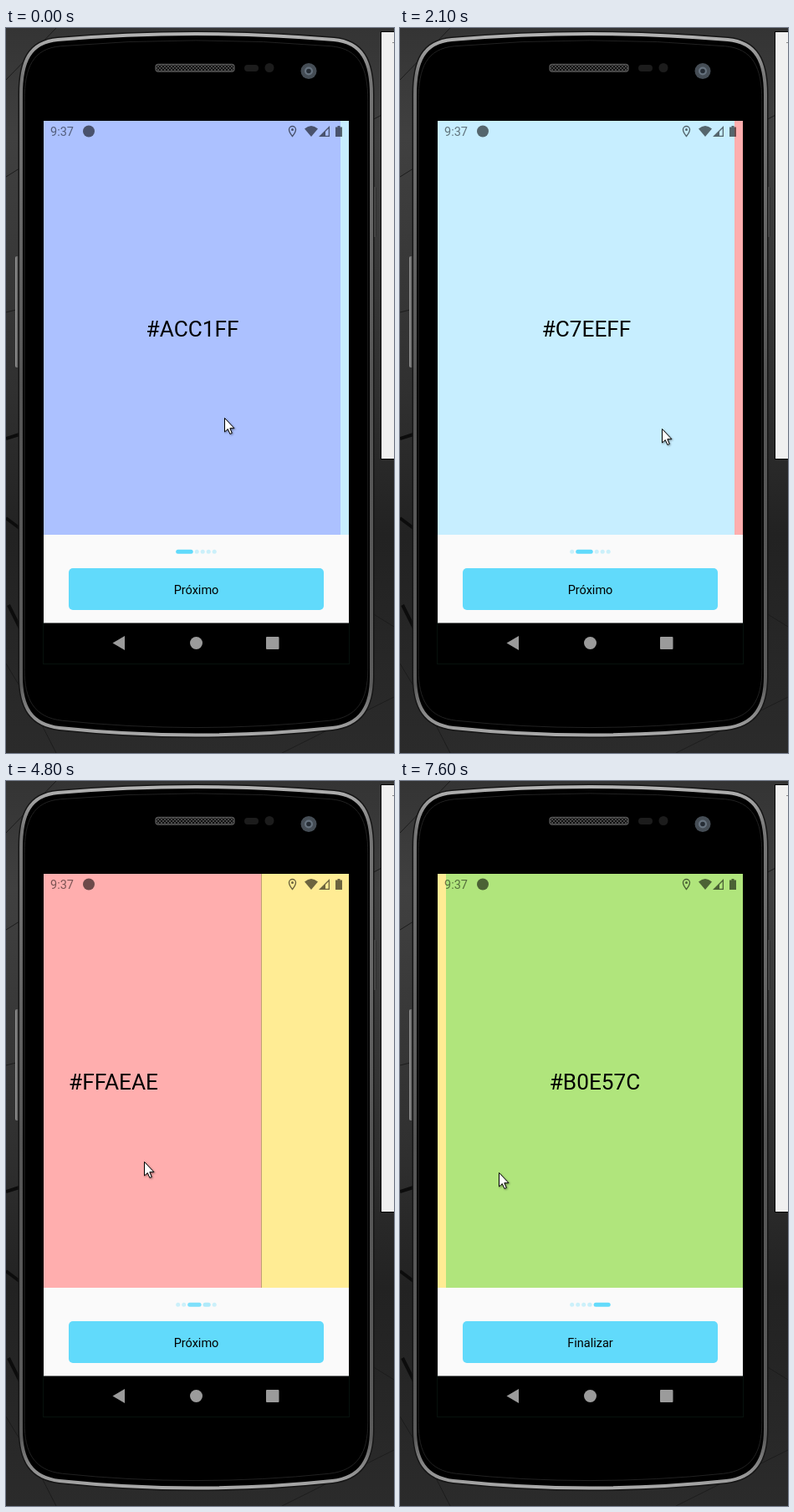
An HTML page that plays this animation: 464x867 px, repeating every 8000 ms.

```html
<!DOCTYPE html>
<html lang="pt">
<head>
<meta charset="utf-8">
<style>
  html, body { margin: 0; height: 100%; overflow: hidden; background: #2b2b2b; }
  svg { display: block; width: 464px; height: 867px; font-family: Roboto, sans-serif; }
  .label { font-size: 26.2px; text-anchor: middle; }
  .small { font-size: 14.5px; }
</style>
</head>
<body>
<svg viewBox="0 0 464 867">
  <defs>
    <linearGradient id="wall" x2="0" y2="1">
      <stop offset="0" stop-color="#343434"/><stop offset=".15" stop-color="#404040"/>
      <stop offset=".5" stop-color="#303030"/><stop offset=".7" stop-color="#222"/>
      <stop offset="1" stop-color="#2b2b2b"/>
    </linearGradient>
    <linearGradient id="rim" x2="0" y2="1">
      <stop offset="0" stop-color="#b4b4b4"/><stop offset=".06" stop-color="#777"/>
      <stop offset=".5" stop-color="#555"/><stop offset=".93" stop-color="#5c5c5c"/>
      <stop offset="1" stop-color="#aaa"/>
    </linearGradient>
    <linearGradient id="key">
      <stop offset="0" stop-color="#999"/><stop offset=".5" stop-color="#666"/>
      <stop offset="1" stop-color="#222"/>
    </linearGradient>
    <pattern id="mesh" width="4" height="4" patternUnits="userSpaceOnUse">
      <rect width="4" height="4" fill="#111"/>
      <path d="M0 0L4 4M4 0L0 4" stroke="#555" stroke-width=".8"/>
    </pattern>
    <clipPath id="view"><rect x="45" y="111" width="365" height="495"/></clipPath>
    <path id="body" d="M18 80C18 40 28 17 62 14Q227 0 392 14C426 17 437 40 437 80V775C437 812 424 833 390 837Q227 854 64 837C30 833 18 812 18 775Z"/>
  </defs>

  <!-- desktop -->
  <rect width="464" height="867" fill="url(#wall)"/>
  <g fill="none" stroke="#1c1c1c">
    <path d="M0 62L60 0M0 178L16 168M0 340L16 336M438 110L464 96M438 700L464 716"/>
    <path d="M0 760L18 790M330 867L464 800M60 867L36 820"/>
    <path d="M0 491L16 486M0 586L16 598M3 690L18 720" stroke="#0c0c0c" stroke-width="4"/>
  </g>
  <rect x="448.5" y="4.5" width="30" height="511" fill="#f0f0f0" stroke="#050505"/>
  <rect x="462" y="17" width="2" height="1" fill="#888"/>

  <!-- phone -->
  <rect x="11" y="273" width="5" height="133" rx="2" fill="url(#key)"/>
  <rect x="438" y="190" width="5" height="60" rx="2" fill="url(#key)"/>
  <use href="#body" stroke="#161616" stroke-width="7"/>
  <use href="#body" stroke="url(#rim)" stroke-width="4"/>
  <use href="#body" fill="none" stroke="#222" transform="translate(4.5 8) scale(.98)"/>
  <rect x="179" y="43.5" width="94" height="8.5" rx="3" fill="url(#mesh)" stroke="#555" stroke-width="1.3"/>
  <rect x="285" y="44" width="17" height="8" rx="4" fill="#1c1c1c"/>
  <circle cx="315" cy="47.5" r="5.5" fill="#1c1c1c"/>
  <circle cx="362" cy="51.5" r="9.5" fill="#454d55"/>
  <circle cx="362" cy="51.5" r="5" fill="#66727e"/>
  <circle cx="362" cy="51.5" r="2.8" fill="#252c34"/>
  <rect x="44.5" y="711" width="366" height="49.5" stroke="#07110d"/>
  <g fill="#9b9b9b">
    <path d="M127.5 735.5L142 727V744Z"/>
    <circle cx="227.5" cy="735.5" r="7.5"/>
    <rect x="311" y="728" width="15.5" height="15" rx="1"/>
  </g>

  <!-- app -->
  <g clip-path="url(#view)"><g id="pages"></g></g>
  <g opacity=".57">
    <text class="small" x="53" y="129" opacity=".9">9:37</text>
    <circle cx="99" cy="123.5" r="7"/>
    <path d="M342.5 117.5a4 4 0 0 0-4 4c0 3 4 8 4 8s4-5 4-8a4 4 0 0 0-4-4z" fill="none" stroke="#000" stroke-width="1.4"/>
    <circle cx="342.5" cy="121.5" r="1.5"/>
    <path d="M357 120.5Q365 113.5 373 120.5L365 130Z"/>
    <path d="M374 130L387 117V130ZM382 124V128.7H385.7V120.2Z" fill-rule="evenodd"/>
    <path d="M394 118.5H396.5V117H399.5V118.5H402V130H394Z"/>
  </g>
  <rect x="45" y="606" width="365" height="105.5" fill="#fafafa"/>
  <g id="dots" fill="#61dafb"></g>
  <rect x="75" y="646" width="305" height="50" rx="5" fill="#61dafb"/>
  <text id="button" class="small" x="227.5" y="677" text-anchor="middle"></text>

  <path id="cursor" d="M.5.5V17L4.3 13.6L6.9 19.5L9.3 18.4L6.8 12.7H12Z" fill="#fff" stroke="#000" style="filter:drop-shadow(1px 1px 1px #0006)"/>
</svg>
<script>
const COLORS = ['#ACC1FF', '#C7EEFF', '#FFAEAE', '#FFEC94', '#B0E57C'];
const PAGE = 355, LOOP = 8000, STEP = 100;

// step:value pairs, joined by straight lines
const track = text => text.split(' ').map(pair => pair.split(':').map(Number));
const scrollTrack = track('7:0 11:104 12:134 14:285 16:347 17:355 21:355 22:385 25:710 30:710 33:850 36:740 40:822 44:740 48:804.5 50:840 53:750 55:797 58:1045 59:1065 69:1065 72:1290 74:1410');
const xTrack = track('2:261 3:265 4:265 6:293 7:293 12:143 17:150 21:313 24:160 27:160 30:262 33:125 36:235 40:153 44:232 48:165 50:130 53:220 55:178 66:178 68:266 69:266 72:118');
const yTrack = track('2:466 3:468 4:468 6:479 25:479 27:479 40:472 48:455 59:461 60:461 66:470 69:470 72:468');

function at(keys, step) {
  const i = keys.findIndex(key => key[0] > step);
  if (i < 0) return keys[keys.length - 1][1];
  if (!i) return keys[0][1];
  const [t0, v0] = keys[i - 1], [t1, v1] = keys[i];
  return v0 + (v1 - v0) * (step - t0) / (t1 - t0);
}

const $ = id => document.getElementById(id);

function add(parent, tag, attrs, text = '') {
  const el = document.createElementNS('http://www.w3.org/2000/svg', tag);
  for (const name in attrs) el.setAttribute(name, attrs[name]);
  el.textContent = text;
  return parent.appendChild(el);
}

COLORS.forEach((fill, i) => {
  const x = 45 + i * PAGE;
  add($('pages'), 'rect', { x, y: 111, width: PAGE, height: 495, fill });
  add($('pages'), 'text', { class: 'label', x: x + PAGE / 2 + 0.5, y: 369 }, fill);
});
const dots = COLORS.map(() => add($('dots'), 'rect', { y: 623.8, height: 5, rx: 2.5 }));

function draw(time) {
  const step = Math.floor(time % LOOP / STEP);
  const scroll = at(scrollTrack, step);
  $('pages').setAttribute('transform', `translate(${-scroll})`);
  $('cursor').setAttribute('transform', `translate(${at(xTrack, step)} ${at(yTrack, step)})`);
  $('button').textContent = step < 76 ? 'Próximo' : 'Finalizar';

  let left = 203.2;
  dots.forEach((dot, i) => {
    const active = Math.max(0, 1 - Math.abs(scroll / PAGE - i));
    const width = 5 + 15.5 * active;
    dot.setAttribute('x', left);
    dot.setAttribute('width', width);
    dot.setAttribute('opacity', 0.3 + 0.7 * active);
    left += width + 2;
  });
}

const start = performance.now();
(function tick() {
  draw(performance.now() - start);
  requestAnimationFrame(tick);
})();
</script>
</body>
</html>
```
